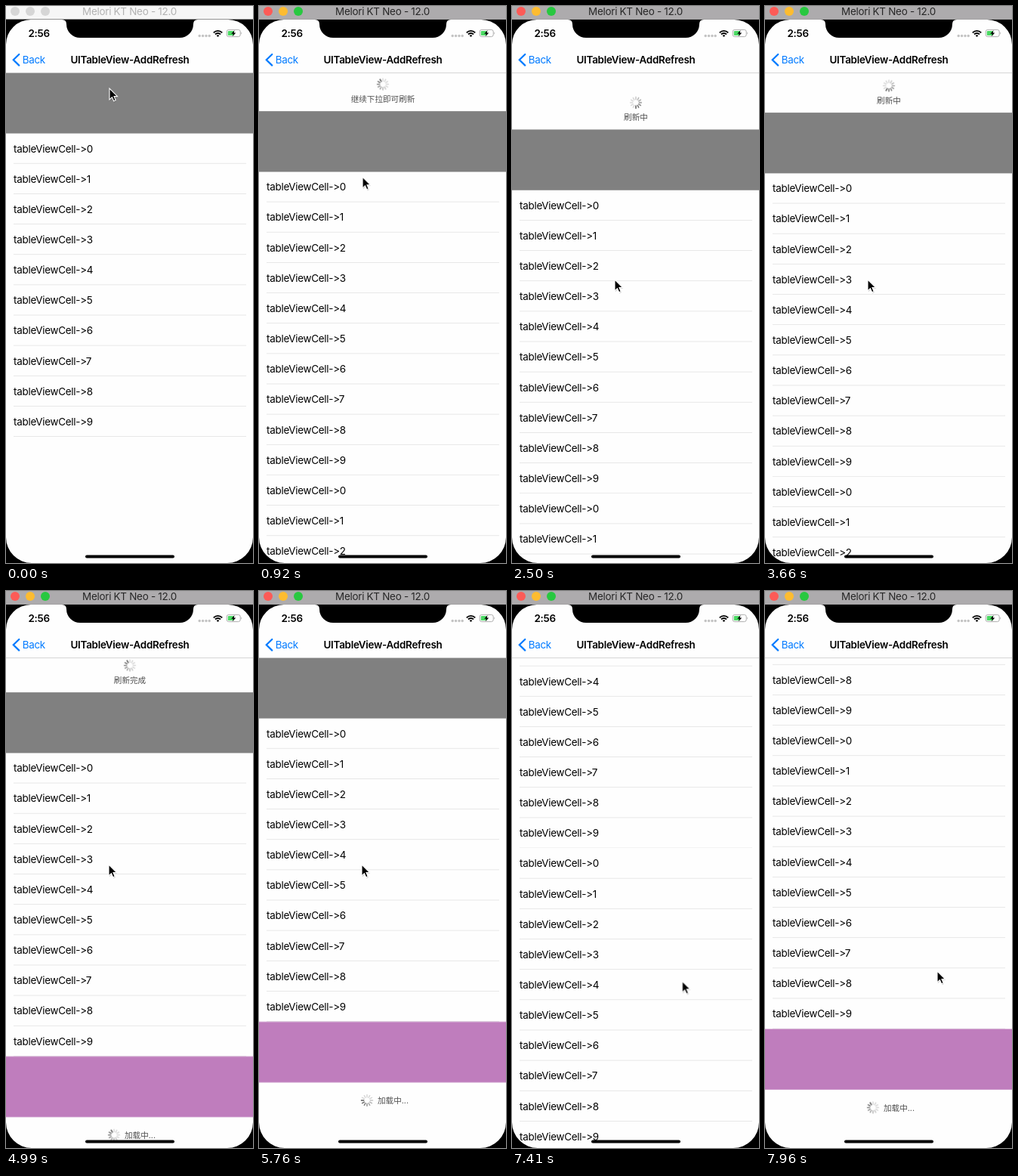
Recreate the animation shown at these times as an HTML page. Size 327 by 737 pixels, loop 8000 ms.

```html
<!DOCTYPE html>
<html lang="zh">
<head>
<meta charset="utf-8">
<title>UITableView-AddRefresh</title>
<style>
  html, body { margin: 0; width: 100%; height: 100%; overflow: hidden; background: #000; }
  svg { display: block; width: 327px; height: 737px; }
  text {
    font: 13.43px Inter, "Noto Sans CJK SC", "Noto Sans CJK", sans-serif;
    letter-spacing: -.02em;
    font-variant-ligatures: none;
    font-feature-settings: "calt" 0;
  }
  .mid { text-anchor: middle; }
  .bold { font-weight: 600; }
  .hint { font-size: 10.6px; letter-spacing: 0; fill: #505050; }
  .spokes line { stroke: #4a4a4a; stroke-width: 1.5; stroke-linecap: round; }
</style>
</head>
<body>
<svg viewBox="0 0 327 737">
  <rect width="327" height="737" fill="#fefefe"/>

  <g id="table">
    <g id="refresh"></g>
    <rect y="88.3" width="327" height="80.3" fill="#808080"/>
    <g id="rows"></g>
    <g id="moreRows"></g>
    <g id="footer">
      <rect y="971.5" width="327" height="80.3" fill="#bf7dbd"/>
      <g id="loading" transform="translate(143 1075.5)"></g>
      <text class="hint" x="157" y="1079.8">加载中...</text>
    </g>
  </g>

  <rect y="18" width="327" height="70.2" fill="#fefefe"/>
  <rect y="88" width="327" height=".7" fill="#c4c4c4"/>
  <path d="M17.3 64L9.8 71.3L17.3 78.6" fill="none" stroke="#007aff" stroke-width="2.2" stroke-linecap="round"/>
  <text x="21.7" y="76" fill="#007aff">Back</text>
  <text class="mid bold" x="164" y="76">UITableView-AddRefresh</text>

  <text class="bold" x="29.5" y="41">2:56</text>
  <g fill="#c3c3c3">
    <circle cx="256.2" cy="39.5" r="1.7"/><circle cx="260.6" cy="39.5" r="1.7"/>
    <circle cx="265" cy="39.5" r="1.7"/><circle cx="269.2" cy="39.5" r="1.7"/>
  </g>
  <g fill="none" stroke="#000" stroke-width="1.9">
    <path d="M274.8 35.3A8 8 0 0 1 286.2 35.3M277 37.5A4.9 4.9 0 0 1 284 37.5"/>
    <path d="M280.5 41L278.6 39.1A2.7 2.7 0 0 1 282.4 39.1Z" fill="#000" stroke="none"/>
  </g>
  <rect x="292.2" y="31.4" width="18" height="9.2" rx="2.6" fill="#fff" stroke="#a6a6a6" stroke-width=".9"/>
  <rect x="293.7" y="32.9" width="8.2" height="6.2" rx="1.2" fill="#4cd964"/>
  <path d="M302.6 32L298.2 36.7H300.9L299.8 40.2L304.3 35.4H301.6Z"/>
  <path d="M311.4 34.3Q313.2 36 311.4 37.7Z" fill="#a6a6a6"/>

  <rect x="105" y="726.6" width="118" height="4" rx="2"/>
  <path fill-rule="evenodd" d="M0 17H327V737H0Z
    M0 51A33 33 0 0 1 33 18H74Q80 18 80 24A18 18 0 0 0 98 42H230A18 18 0 0 0 248 24Q248 18 254 18H294A33 33 0 0 1 327 51
    V703A34 34 0 0 1 293 737H34A34 34 0 0 1 0 703Z"/>

  <g id="idleBar"></g>
  <g id="activeBar"></g>

  <g id="cursor">
    <path d="M.8 1.4V16.2L4.2 13L6.5 18.2L9 17.1L6.8 12H11.3Z" fill="#000" opacity=".18"/>
    <path d="M0 0V14.8L3.4 11.6L5.7 16.8L8.2 15.7L6 10.6H10.5Z" stroke="#fff" stroke-width="1.1"/>
  </g>
</svg>

<script>
const LOOP = 8000, ROW = 40.15, ROWS_TOP = 168.5;
const $ = id => document.getElementById(id);

function play(el, frames) {
  el.animate(frames.map(([t, style, easing = 'linear']) => ({ offset: t / LOOP, easing, ...style })),
    { duration: LOOP, iterations: Infinity });
}
const move = (el, steps) =>
  play(el, steps.map(([t, x, y]) => [t, { transform: `translate(${x}px, ${y}px)` }]));
const show = (el, ...spans) => {
  const hold = 'steps(1, end)';
  const frames = [[0, { opacity: 0 }, hold]];
  for (const [from, to] of spans) frames.push([from, { opacity: 1 }, hold], [to, { opacity: 0 }, hold]);
  if (spans.at(-1)[1] < LOOP) frames.push([LOOP, { opacity: 0 }]);
  play(el, frames);
};

function titleBar(el, fill, ink, lights) {
  el.innerHTML = `<rect width="327" height="17.6" fill="${fill}"/>` +
    lights.map((c, i) => `<circle cx="${12 + 20 * i}" cy="7" r="6" fill="${c}"/>`).join('') +
    `<text class="mid" x="163.5" y="12.2" fill="${ink}">Melori KT Neo - 12.0</text>`;
}

function spinner(el) {
  let lines = '';
  for (let i = 0; i < 12; i++)
    lines += `<line y1="-4.3" y2="-7.4" transform="rotate(${-30 * i})" opacity="${Math.max(.22, .9 - i * .1)}"/>`;
  el.innerHTML = `<g class="spokes">${lines}</g>`;
  el.firstChild.animate([{ transform: 'rotate(0deg)' }, { transform: 'rotate(360deg)' }],
    { duration: 1000, iterations: Infinity, easing: 'steps(12, end)' });
}

function cells(el, first) {
  for (let i = first; i < first + 10; i++) {
    const y = ROWS_TOP + i * ROW;
    el.innerHTML += `<text x="10" y="${y + 25}">tableViewCell-&gt;${i % 10}</text>
      <rect x="10" y="${y + ROW - .8}" width="308" height=".8" fill="#e2e2e2"/>`;
  }
}

titleBar($('idleBar'), '#f6f6f6', '#b2b2b2', ['#d6d6d6', '#d6d6d6', '#d6d6d6']);
titleBar($('activeBar'), '#adabad', '#262626', ['#fc5b57', '#fdbc30', '#28c840']);
cells($('rows'), 0);
cells($('moreRows'), 10);
spinner($('loading'));

$('refresh').innerHTML = '<g transform="translate(164 52.7)"></g>' +
  ['继续下拉即可刷新', '松手即可刷新', '刷新中', '刷新完成']
    .map(s => `<text class="hint mid" x="164" y="76.2">${s}</text>`).join('');
const [wheel, ...hints] = $('refresh').children;
spinner(wheel);

const ACTIVATE = 260, ARMED = 1000, RELEASE = 2380, RELOAD = 4900, APPEND = 6230;
show($('activeBar'), [ACTIVATE, LOOP]);
show(hints[0], [0, ARMED]);
show(hints[1], [ARMED, RELEASE]);
show(hints[2], [RELEASE, RELOAD]);
show(hints[3], [RELOAD, LOOP]);
show($('moreRows'), [0, RELOAD], [APPEND, LOOP]);

const near = -10 * ROW;
move($('footer'), [[0, 0, 0], [RELOAD, 0, 0], [RELOAD, 0, near], [APPEND, 0, near], [APPEND, 0, 0], [LOOP, 0, 0]]);

move($('table'), [
  [0, 0], [340, 0], [420, 6], [920, 50.8], [1000, 55.5], [1640, 91.5], [1850, 99.5], [2150, 101], [RELEASE, 101],
  [2430, 93], [2500, 75.3], [2560, 65.5], [2620, 59.3], [2710, 54.2], [2800, 52.8], [RELOAD, 52.8],
  [4990, 46], [5080, 29], [5170, 12], [5260, 3], [5330, 0], [7050, 0],
  [7110, -10], [7190, -45], [7270, -105], [7350, -180], [7430, -245], [7520, -300], [7610, -343],
  [7700, -370], [7790, -384], [7870, -390], [7960, -392], [LOOP, -392]
].map(([t, y]) => [t, 0, y]));

move($('cursor'), [
  [0, 137, 109], [180, 137, 109], [300, 137, 118], [420, 137, 133], [920, 137, 226], [1640, 139, 335],
  [1850, 138, 356], [2150, 136, 362], [6080, 136, 362], [6350, 138, 543], [6730, 138, 543],
  [6730, 150, 548], [6785, 180, 585], [6840, 209, 621], [7080, 209, 621], [7190, 213, 590],
  [7350, 223, 528], [7480, 228, 503], [LOOP, 228, 503]
]);
</script>
</body>
</html>
```
